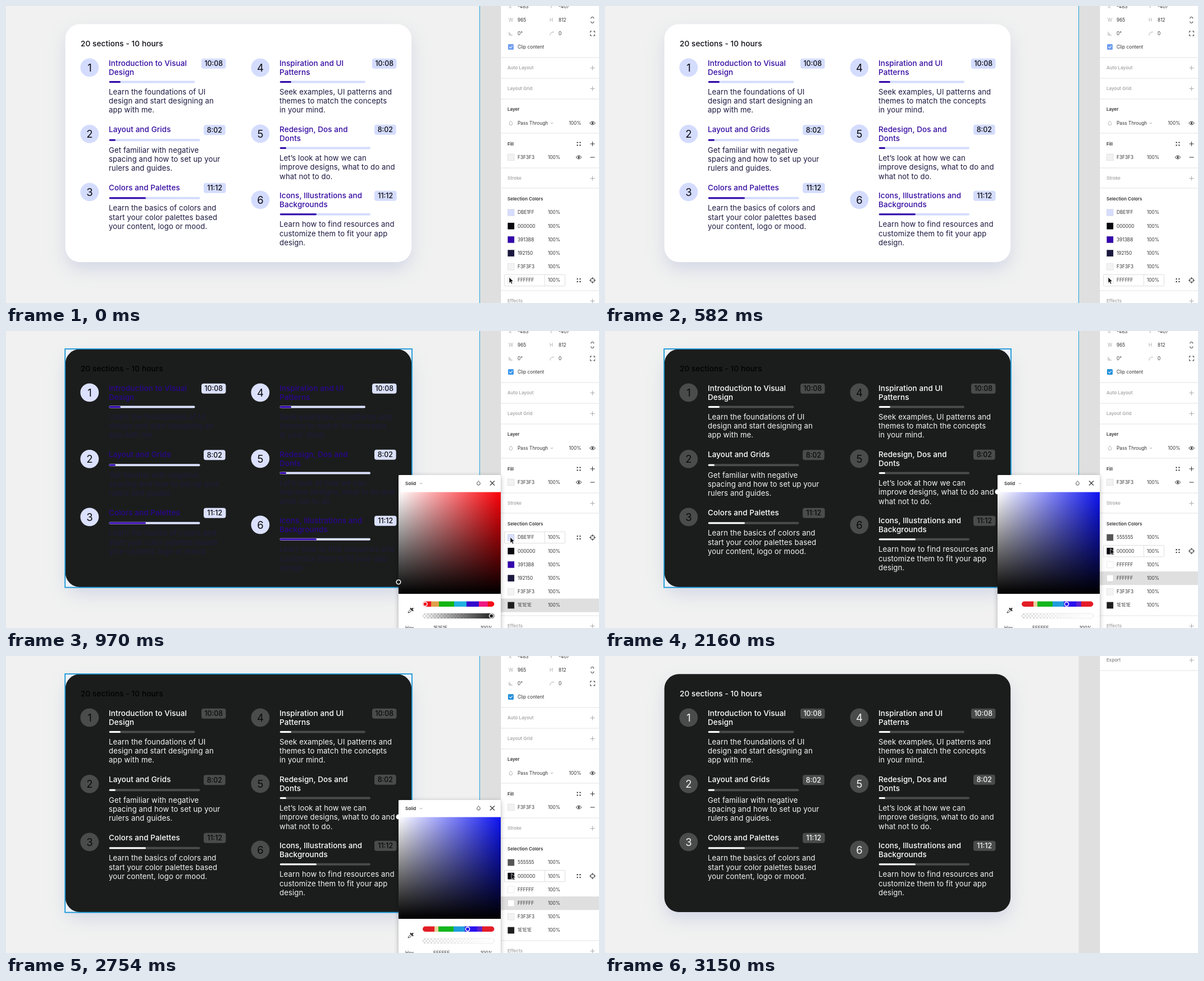
An HTML page that plays this animation: 1056x530 px, repeating every 3560 ms.

```html
<!DOCTYPE html>
<html lang="en">
<head>
<meta charset="utf-8">
<title>Dark mode colors</title>
<style>
  html, body { margin: 0; width: 100%; height: 100%; overflow: hidden; background: #f0f1f0; }
  svg { display: block; width: 1056px; height: 530px; font-family: Inter, "Noto Sans", sans-serif; }
</style>
</head>
<body>
<svg id="stage" viewBox="0 0 1056 530" xmlns="http://www.w3.org/2000/svg"></svg>
<script>
const LOOP = 3560;
const stage = document.getElementById('stage');

const sections = [
  { x: 183, y: 102, time: '10:08', head: ['Introduction to Visual', 'Design'], bar: 135.5, len: 153.5, done: 21,
    body: ['Learn the foundations of UI', 'design and start designing an', 'app with me.'] },
  { x: 183, y: 220.5, time: '8:02', head: ['Layout and Grids'], bar: 239.2, len: 162.5, done: 12,
    body: ['Get familiar with negative', 'spacing and how to set up your', 'rulers and guides.'] },
  { x: 183, y: 324, time: '11:12', head: ['Colors and Palettes'], bar: 342.8, len: 162.5, done: 66,
    body: ['Learn the basics of colors and', 'start your color palettes based', 'your content, logo or mood.'] },
  { x: 487, y: 102, time: '10:08', head: ['Inspiration and UI', 'Patterns'], bar: 135.5, len: 153, done: 21,
    body: ['Seek examples, UI patterns and', 'themes to match the concepts', 'in your mind.'] },
  { x: 487, y: 220, time: '8:02', head: ['Redesign, Dos and', 'Donts'], bar: 253.6, len: 162, done: 12,
    body: ['Let’s look at how we can', 'improve designs, what to do and', 'what not to do.'] },
  { x: 487, y: 338, time: '11:12', head: ['Icons, Illustrations and', 'Backgrounds'], bar: 371.8, len: 162, done: 66,
    body: ['Learn how to find resources and', 'customize them to fit your app', 'design.'] }
];

const dark = '#1b1d1c';
const red = { hue: '#fb0007', knob: [699, 448], dot: dark, hueX: 746.5, alpha: '#1e1e1e', hex: '1E1E1E',
  bands: [['#f0101c', 757], ['#e0a04c', 771], ['#14b414', 798], ['#20b0e0', 820], ['#3208cc', 842], ['#ee1a82', 858], ['#f20d18', 869]] };
const blue = { hue: '#0d14f2', knob: [699, 287], dot: '#fff', hueX: 822, alpha: '#fff', hex: 'FFFFFF',
  bands: [['#e21c24', 763], ['#e6d29c', 770], ['#14b61c', 797], ['#209cdc', 817], ['#2a12ee', 839], ['#5a20d0', 848], ['#e41c28', 869]] };

const lightSwatches = ['DBE1FF', '000000', '3913B8', '192150', 'F3F3F3', 'FFFFFF'];
const states = [
  { until: 970, card: '#fff', title: '#0c0c14', head: '#340aa0', body: '#1c1940', soft: '#d4dcfe', done: '#3207a6', num: '#0c0c14',
    line: true, panel: true, swatches: lightSwatches, hover: 5, cursor: [896, 484], check: '#6f9df0' },
  { until: 2160, card: dark, title: '#000', head: '#2a0690', body: '#1f1b3d', soft: '#dbe1fd', done: '#3403b4', num: '#08080c',
    line: true, panel: true, swatches: [...lightSwatches.slice(0, 5), '1E1E1E'], hover: 0, active: 5, cursor: [898, 368],
    check: '#3d97ee', picker: red },
  { until: 3150, card: dark, title: '#000', head: '#fff', body: '#f4f4f4', soft: '#4a4b4b', done: '#fff', num: '#0a0a0a',
    line: true, panel: true, swatches: ['555555', '000000', 'FFFFFF', 'FFFFFF', 'F3F3F3', '1E1E1E'], hover: 1, active: 3,
    cursor: [900, 388], check: '#2290dc', picker: blue },
  { until: LOOP, card: dark, title: '#fff', head: '#fff', body: '#f4f4f4', soft: '#4a4b4b', done: '#fff', num: '#f6f6f6' }
];

const attrs = o => Object.entries(o).map(([k, v]) => ` ${k}="${v}"`).join('');
const rect = (x, y, w, h, fill, o = {}) =>
  `<rect x="${x}" y="${y}" width="${w}" height="${h}" fill="${fill}"${attrs(o)}/>`;
const circle = (x, y, r, fill, o = {}) => `<circle cx="${x}" cy="${y}" r="${r}" fill="${fill}"${attrs(o)}/>`;
const path = (d, color, width = 1, o = {}) =>
  `<path d="${d}" fill="none" stroke="${color}" stroke-width="${width}"${attrs(o)}/>`;
// y is the middle of the capitals
const text = (s, x, y, size, fill, o = {}) =>
  `<text x="${x}" y="${y + size * 0.36}" font-size="${size}" fill="${fill}"${attrs(o)}>${s}</text>`;

const ink = '#333', pale = '#a9a9a9';
const label = (s, x, y, fill = ink) => text(s, x, y, 8.3, fill);
const bold = (s, x, y, fill = ink) => text(s, x, y, 8, fill, { 'font-weight': 600 });
const plus = (x, y, c) => path(`M${x - 4} ${y}h8M${x} ${y - 4}v8`, c);
const minus = (x, y) => path(`M${x - 4} ${y}h8`, ink);
const rule = y => path(`M881 ${y}h175`, '#e3e3e3');
const chevron = (x, y) => path(`M${x - 2} ${y - 1}l2 2 2-2`, '#999', 0.9);
const drop = (x, y, c) => path(`M${x} ${y - 4}c1 1.6 2.8 2.6 2.8 4.8a2.8 2.8 0 0 1-5.6 0c0-2.2 1.8-3.2 2.8-4.8z`, c, 0.9);
const dots = (x, y) => [[-2.4, -2.4], [2.4, -2.4], [-2.4, 2.4], [2.4, 2.4]]
  .map(([a, b]) => circle(x + a, y + b, 1.2, ink)).join('');
const eye = (x, y) => path(`M${x - 4.8} ${y}q4.8-6 9.6 0q-4.8 6-9.6 0z`, ink, 1) + circle(x, y, 1.7, ink);
const target = (x, y) => circle(x, y, 3.7, 'none', { stroke: ink }) +
  path(`M${x - 5.5} ${y}h3.5M${x + 2} ${y}h3.5M${x} ${y - 5.5}v3.5M${x} ${y + 2}v3.5`, ink);

const defs = hue => `<defs>
  <filter id="blur" x="-20%" y="-20%" width="140%" height="150%"><feGaussianBlur stdDeviation="15"/></filter>
  <filter id="soft" x="-20%" y="-20%" width="140%" height="140%"><feGaussianBlur stdDeviation="4"/></filter>
  <linearGradient id="tint"><stop stop-color="#fff"/><stop offset="1" stop-color="${hue}"/></linearGradient>
  <linearGradient id="shade" x2="0" y2="1"><stop stop-opacity="0"/><stop offset="1"/></linearGradient>
  <pattern id="checks" width="6" height="6" patternUnits="userSpaceOnUse">
    <rect width="6" height="6" fill="#fff"/><path d="M0 0h3v3h-3zM3 3h3v3h-3z" fill="#dcdcdc"/></pattern>
  <clipPath id="hueClip"><rect x="742" y="482.5" width="127.500" height="9.500" rx="4.700"/></clipPath>
</defs>`;

function section(item, i, s) {
  const { x, y } = item;
  const heads = item.head.map((t, k) =>
    text(t, x, y + k * 16.2, 13.5, s.head, { 'font-weight': 500, 'letter-spacing': 0.08 }));
  const lines = item.body.map((t, k) =>
    text(t, x, item.bar + 17.8 + k * 16.2, 13.2, s.body, { 'letter-spacing': 0.09 }));
  const left = x + (item.time === '10:08' ? 165 : 169);
  const width = x + (item.time === '8:02' ? 207.7 : 208.5) - left;
  return circle(x - 34.2, y + 7.8, 16.4, s.soft) +
    text(i + 1, x - 34, y + 8, 18.5, s.num, { 'text-anchor': 'middle' }) +
    heads.join('') +
    rect(left, y - 8.3, width, 18, s.soft, { rx: 4 }) +
    text(item.time, left + width / 2, y + 1, 12.4, s.num, { 'text-anchor': 'middle', 'font-weight': 500 }) +
    rect(x + 0.5, item.bar - 2, item.len - 0.5, 4, s.soft, { rx: 2 }) +
    rect(x + 0.8, item.bar - 1.5, item.done - 0.8, 3, s.done, { rx: 1.5 }) +
    lines.join('');
}

function card(s) {
  let out = rect(106, 46, 616, 424, '#c3c8e0', { rx: 26, filter: 'url(#blur)', opacity: 0.62 });
  if (s.picker) out += rect(105, 32, 618, 425.5, '#edf1f8');
  out += rect(105.7, 32.3, 616.5, 424.7, s.card, { rx: 26 });
  out += text('20 sections - 10 hours', 133, 67.5, 13.6, s.title, { 'font-weight': 500, 'letter-spacing': 0.1 });
  out += sections.map((item, i) => section(item, i, s)).join('');
  if (s.picker) out += rect(105.2, 32, 617.8, 425.6, 'none', { stroke: '#1596d8', 'stroke-width': 1.8 });
  return out;
}

function swatchRow(s, hex, i) {
  const y = 368.5 + i * 24.2;
  const hover = s.hover === i;
  const shown = { DBE1FF: '#d6ddff', '000000': '#08080f', '3913B8': '#3306ac', '192150': '#1a183f' }[hex] || '#' + hex;
  let out = s.active === i ? rect(881, y - 12, 175, 24.2, '#dfdfdf') : '';
  if (hover) {
    out += rect(887.5, y - 10.2, 108, 20.4, '#fff', { stroke: '#dedede', rx: 1 }) + path(`M959.5 ${y - 10}v20`, '#dedede');
    out += dots(1020, y) + target(1044.5, y);
  }
  return out + rect(893.5, y - 5.8, 11.6, 11.6, shown, { stroke: 'rgba(0,0,0,.1)', 'stroke-width': 0.8 }) +
    label(hex, 911, y) + label('100%', 965, y);
}

function panel(s) {
  const fields = [['X', '-483', 895, 1], ['Y', '-407', 968, 1], ['W', '965', 895, 25], ['H', '812', 968, 25]]
    .map(([k, v, x, y]) => label(k, x, y, pale) + label(v, x + 16, y)).join('');
  return fields +
    path('M1041.800 22.500v-.5a2.500 2.500 0 0 1 5 0v.5M1041.800 27.500v.5a2.500 2.500 0 0 0 5 0v-.5', ink) +
    path('M896 46v6h6M896 49a3 3 0 0 1 3 3', pale, 0.9) + label('0°', 911, 49) +
    path('M969 52.500v-1a5 5 0 0 1 5-5h2', pale, 0.9) + label('0', 984, 49) +
    path('M1040.500 47.500v-2.500h2.500M1046 45h2.500v2.500M1048.500 50.500v2.500h-2.500M1043 53h-2.500v-2.500', ink) +
    rect(894, 68, 10, 10, s.check, { rx: 1.5 }) + path('M896.500 73l2 2 3.500-4', '#fff', 1.1) + label('Clip content', 911, 73.3) +
    [92, 129, 166, 227, 289, 325, 508].map(rule).join('') +
    bold('Auto Layout', 893, 110.5, pale) + plus(1044.5, 110.5, pale) +
    bold('Layout Grid', 893, 147.5, pale) + plus(1044.5, 147.5, pale) +
    bold('Layer', 893, 184.5) +
    drop(899, 209, pale) + label('Pass Through', 911, 209) + chevron(972, 209) + label('100%', 1002.5, 209) + eye(1044.5, 209) +
    bold('Fill', 893, 246) + dots(1020, 246) + plus(1044.5, 246, ink) +
    rect(893.5, 264.2, 11.6, 11.6, '#f1f1f1', { stroke: '#dedede', 'stroke-width': 0.8 }) +
    label('F3F3F3', 911, 270) + label('100%', 965, 270) + eye(1020, 270) + minus(1044.5, 270) +
    bold('Stroke', 893, 307.5, pale) + plus(1044.5, 307.5, pale) +
    bold('Selection Colors', 893, 344.5) +
    s.swatches.map((hex, i) => swatchRow(s, hex, i)).join('') +
    bold('Effects', 893, 526.5, pale) + plus(1044.5, 526.5, pale);
}

function picker(p) {
  let from = 742;
  const bands = p.bands.map(([c, to]) => {
    const band = rect(from, 482, to - from + 1, 11, c);
    from = to;
    return band;
  }).join('');
  const knob = (x, y, fill, r = 3.8) =>
    circle(x, y, r + 0.8, 'rgba(0,0,0,.18)') + circle(x, y, r, fill, { stroke: '#fff', 'stroke-width': 1.5 });
  return `<defs><linearGradient id="alpha"><stop stop-color="${p.alpha}" stop-opacity="0"/><stop offset="1" stop-color="${p.alpha}"/></linearGradient></defs>` +
    rect(699, 259, 182, 290, '#000', { opacity: 0.28, filter: 'url(#soft)' }) +
    rect(699, 257, 182, 280, '#fff', { rx: 1.5 }) +
    bold('Solid', 711, 271.8) + chevron(739, 272) + drop(841.5, 271.5, ink) +
    path('M862 267.500l8 8M870 267.500l-8 8', ink, 1.1) +
    rect(699, 287.5, 182, 181.5, 'url(#tint)') + rect(699, 287.5, 182, 181.5, 'url(#shade)') +
    knob(...p.knob, p.dot) +
    path('M716 503l1-2.500 4-4 1.800 1.800-4 4z', ink, 1) +
    path('M720.500 495l4 4M722.500 497l2-2', ink, 2.3, { 'stroke-linecap': 'round' }) +
    `<g clip-path="url(#hueClip)">${bands}</g>` + knob(p.hueX, 487.3, p === red ? '#f0101c' : '#2a12ee', 3.6) +
    rect(742, 503.8, 127.5, 9.2, 'url(#checks)', { rx: 4.6 }) +
    rect(742, 503.8, 127.5, 9.2, 'url(#alpha)', { rx: 4.6, stroke: 'rgba(0,0,0,.1)', 'stroke-width': 0.6 }) +
    knob(864.3, 508.4, p.alpha, 3.6) +
    label('Hex', 711, 530.5) + label(p.hex, 761, 530.5) + label('100%', 845, 530.5);
}

const cursor = ([x, y]) =>
  `<path d="M${x} ${y}v10.500l2.400-2.200 1.700 3.800 1.900-.8-1.700-3.700h3.300z" fill="#0b0b10" stroke="#fff" stroke-width=".7"/>`;

function draw(s) {
  let out = defs(s.picker ? s.picker.hue : '#fff') + rect(0, 0, 1056, 530, '#f0f1f0') + card(s);
  out += rect(843.5, 0, 38, 530, '#dfdfdf') + rect(881, 0, 175, 530, '#fff') + path('M880.800 0v530', '#d6d6d6', 0.7);
  if (s.line) out += path('M843.500 0v530', '#38ace0', 1.2);
  out += s.panel ? panel(s) : bold('Export', 893, 7.5, '#8f8f8f') + plus(1044.5, 7.5, pale) + rule(26);
  if (s.picker) out += picker(s.picker);
  if (s.cursor) out += cursor(s.cursor);
  stage.innerHTML = out;
}

const start = performance.now();
let current;
function tick() {
  const t = (performance.now() - start) % LOOP;
  const next = states.find(s => t < s.until);
  if (next !== current) draw(current = next);
  requestAnimationFrame(tick);
}
tick();
</script>
</body>
</html>
```
